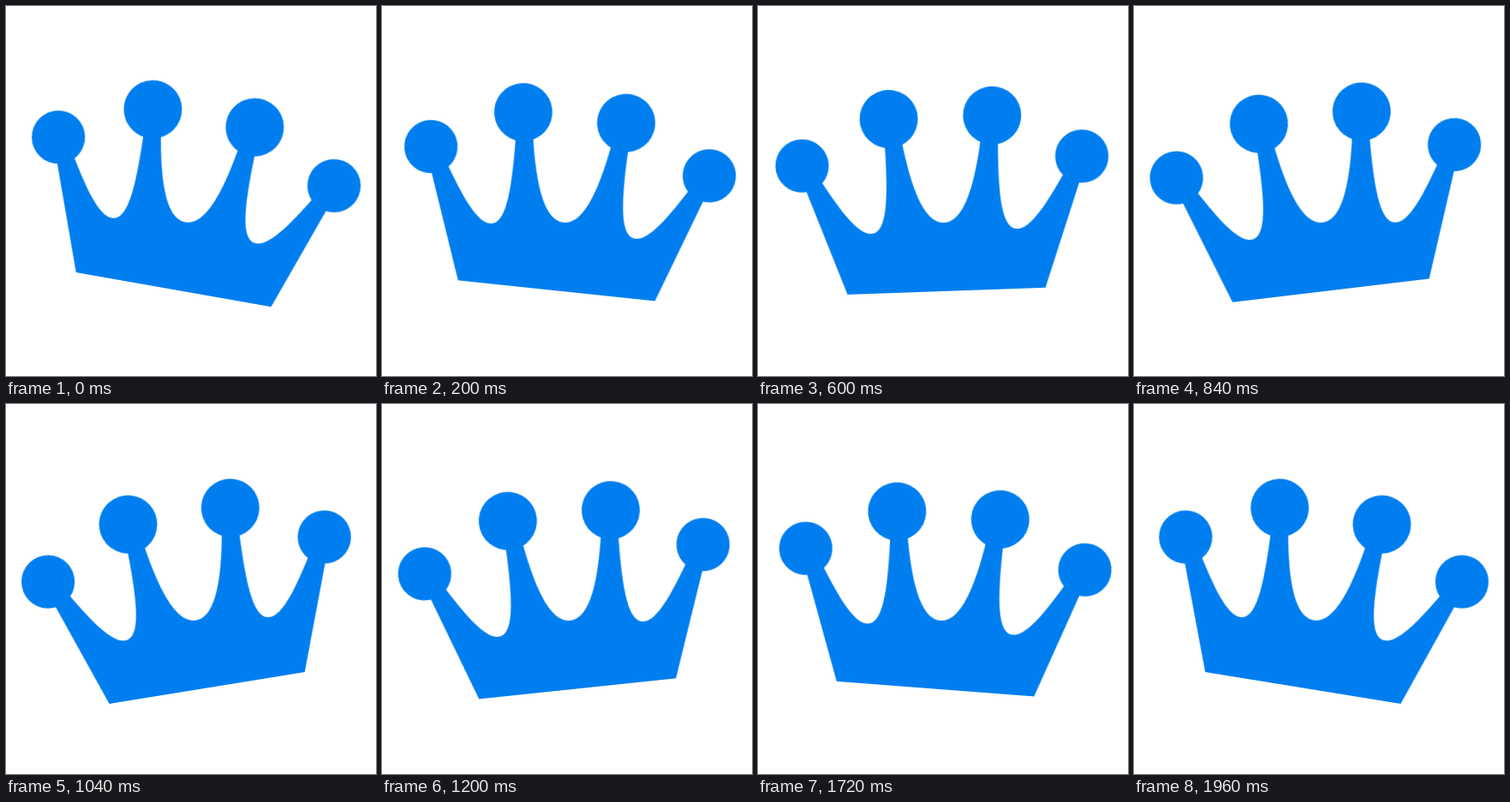
Recreate the animation shown at these times as an HTML page. Size 432x432 px, loop 2000 ms.

```html
<!DOCTYPE html>
<html lang="en">
<head>
<meta charset="utf-8">
<title>Rocking crown</title>
<style>
  html, body {
    margin: 0;
    width: 100%;
    height: 100%;
    overflow: hidden;
    background: #fff;
  }
  svg {
    display: block;
    width: 100vw;
    height: 100vh;
  }
  .crown {
    fill: #007eef;
    transform-origin: 216px 216px;
    animation: rock 2s steps(25, end) infinite;
  }
  /* Constant speed each way, 25 poses per second */
  @keyframes rock {
    0%, 100% { transform: rotate(10deg); }
    50% { transform: rotate(-10deg); }
  }
</style>
</head>
<body>
<svg viewBox="0 0 432 432">
  <defs>
    <!-- Left half, with a sliver past the axis to hide the seam -->
    <g id="half">
      <path d="M1 116.9H-115.6L-166 -23L-150 -29.6L-140.5 -14
               C-121 18 -101 47.1 -85.8 47.1
               C-67 47.1 -64.2 9 -66 -53.3
               L-66.5 -70H-48L-45.5 -56
               C-38 -12 -25 37 0 37H1Z"/>
      <circle cx="-163.4" cy="-35" r="31.1"/>
      <circle cx="-60.4" cy="-86.2" r="34"/>
    </g>
  </defs>
  <g class="crown">
    <use href="#half" transform="translate(216 216)"/>
    <use href="#half" transform="translate(216 216) scale(-1 1)"/>
  </g>
</svg>
</body>
</html>
```
